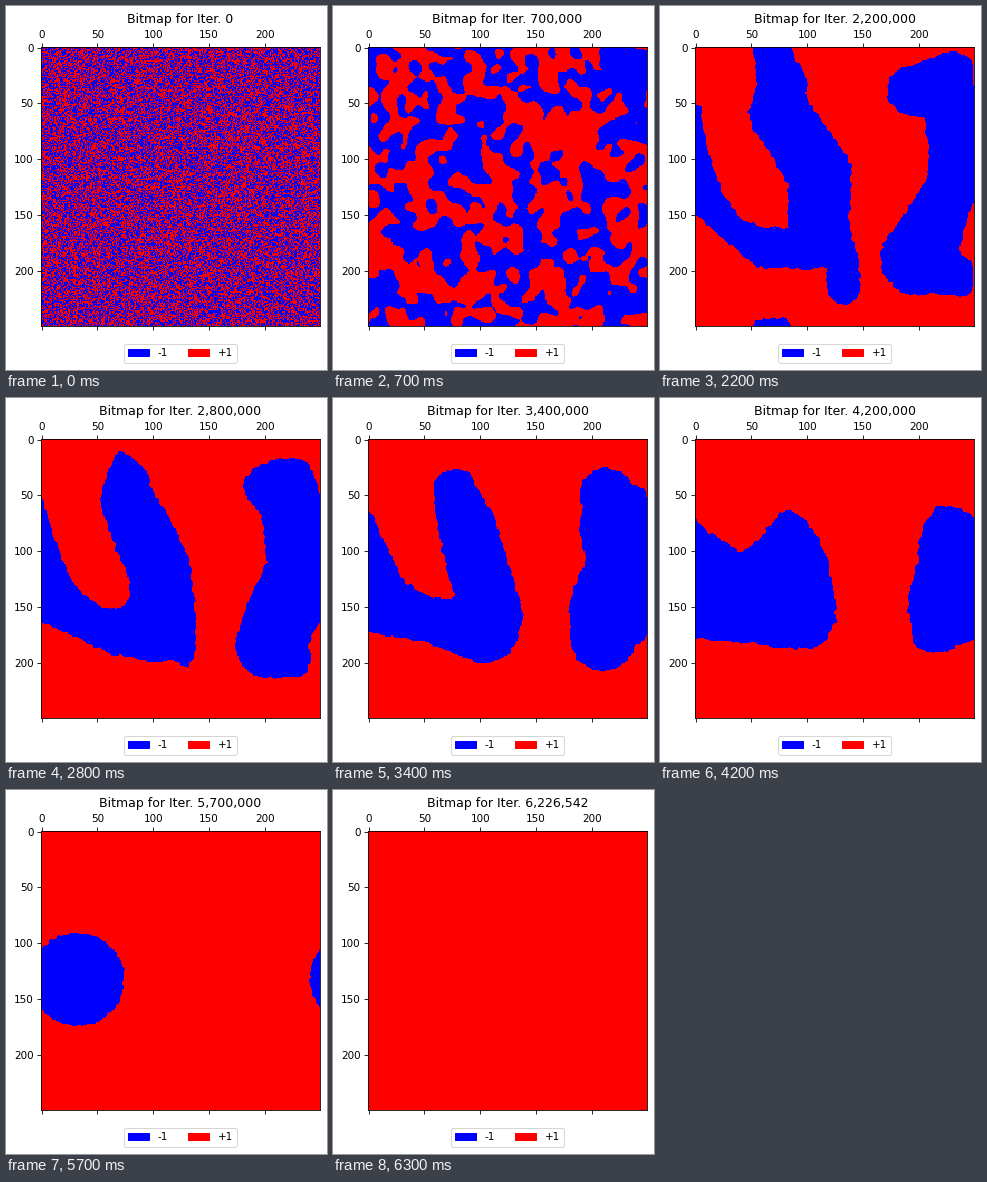
Recreate the animation shown at these times as a matplotlib script. Size 321 by 364 pixels, loop 6.4 s.

```python
import numpy as np
import matplotlib.pyplot as plt
from matplotlib.animation import FuncAnimation
from matplotlib.colors import ListedColormap
from matplotlib.patches import Patch

W, H, DPI = 321, 364, 72
S = 75 / 72                      # text and line scale
LEFT, TOP, SIDE = 35, 41, 279
N, FRAMES, INTERVAL = 250, 64, 100
LAST_ITER = 6226542
CELL = SIDE / N

plt.rcParams.update({
    "font.family": "DejaVu Sans", "font.size": 10 * S,
    "axes.titlesize": 12 * S, "axes.titlepad": 6 * S,
    "axes.linewidth": 0.8 * S, "patch.linewidth": S,
    **{f"{a}tick.major.{k}": v * S for a in "xy"
       for k, v in (("size", 3.5), ("pad", 3.5), ("width", 0.8))},
})

rng = np.random.default_rng(4)
centers = (np.arange(N) + 0.5) * CELL
GX, GY = np.meshgrid(LEFT + centers, TOP + centers)


def blur(a, sigma):
    f = np.fft.fftfreq(N)
    g = np.exp(-2 * (np.pi * sigma * f) ** 2)
    return np.fft.ifft2(np.fft.fft2(a) * np.outer(g, g)).real


def unit(a):
    return (a - a.mean()) / a.std()


def limbs(*chains):
    """Signed distance in cells to thick limbs through (x, y, radius)."""
    field = np.full((N, N), -np.inf)
    for chain in chains:
        for (x0, y0, r0), (x1, y1, r1) in zip(chain, chain[1:]):
            dx, dy = x1 - x0, y1 - y0
            t = ((GX - x0) * dx + (GY - y0) * dy) / (dx * dx + dy * dy)
            t = np.clip(t, 0, 1)
            d = np.hypot(GX - x0 - t * dx, GY - y0 - t * dy)
            field = np.maximum(field, r0 + t * (r1 - r0) - d)
    return field / CELL


def blob(k, cx=71.5, cy=189):
    """Last domain: a rounded box on the wrapped grid, losing area evenly."""
    u = (k - 50) / 12.3
    flat = max(0, 1 - 2 * u)
    r, q, n = 71 * np.sqrt(1 - u), 1 + 0.22 * flat, 2 + flat
    dx = np.abs(GX - cx)
    dx = np.minimum(dx, SIDE - dx) / (r * q)
    dy = np.abs(GY - cy) / (r / q)
    return (1 - (dx ** n + dy ** n) ** (1 / n)) * r / q / CELL


early = limbs(
    [(70, 40, 10), (131, 40, 10), (131, 62, 14), (114, 106, 34),
     (146, 160, 18), (152, 200, 20), (186, 245, 18), (186, 282, 18),
     (168, 322, 12)],
    [(150, 165, 12), (210, 165, 11)],
    [(35, 138, 17), (40, 160, 23), (42, 185, 17), (54, 205, 11),
     (83, 235, 10), (118, 248, 24), (145, 225, 20)],
    [(222, 86, 13), (262, 75, 26), (290, 52, 34), (300, 120, 28),
     (298, 165, 23), (250, 234, 31), (250, 272, 30), (310, 273, 16)],
    [(30, 273, 17), (38, 273, 17)],
    [(78, 316, 12), (122, 316, 12)])
middle = limbs(
    [(111, 38, 18), (122, 80, 25), (119, 106, 30), (160, 168, 32),
     (158, 218, 31), (182, 255, 17), (184, 281, 17)],
    [(150, 242, 21), (105, 242, 20), (74, 225, 13), (47, 195, 17),
     (38, 160, 14), (33, 105, 7)],
    [(252, 85, 25), (290, 78, 32), (301, 140, 31), (290, 185, 25),
     (258, 252, 37), (300, 271, 19)],
    [(100, 320, 7), (122, 320, 8)])
late = limbs(
    [(122, 93, 22), (134, 130, 29), (158, 215, 32), (152, 232, 33),
     (95, 223, 22), (48, 205, 31), (35, 160, 22), (32, 125, 11)],
    [(274, 97, 27), (290, 128, 43), (297, 165, 43), (279, 213, 43),
     (270, 240, 33)])
KEYS = [(15, early), (22, middle), (34, late), (50, blob(50))]

# Random spins lean slightly towards the domains they grow into.
spins = rng.normal(size=(N, N)) + 0.03 * np.tanh(early / 10)
rough = 0.6 * unit(blur(rng.normal(size=(N, N)), 1.5))


def blue_cells(k):
    if k == 0:
        return spins > 0
    if k == FRAMES - 1:
        return np.zeros((N, N), bool)
    if k < 15:
        # domain width grows with the square root of time
        s = max(0, (k - 7) / 8)
        grain = unit(blur(spins, 1.6 * np.sqrt(k)))
        return (1 - s) * 6 * grain + s ** 1.6 * early > 0
    if k >= 50:
        return blob(k) + rough > 0
    for (k0, a), (k1, b) in zip(KEYS, KEYS[1:]):
        if k0 <= k < k1:
            s = (k - k0) / (k1 - k0)
            mix = blur((1 - s) * a + s * b, 1 + 12 * s * (1 - s))
            return mix + rough > 0


fig = plt.figure(figsize=(W / DPI, H / DPI), dpi=DPI, facecolor="white")
ax = fig.add_axes([LEFT / W, 1 - (TOP + SIDE) / H, SIDE / W, SIDE / H])
image = ax.matshow(np.zeros((N, N)), cmap=ListedColormap(["blue", "red"]),
                   vmin=0, vmax=1, interpolation="nearest")
title = ax.set_title("Bitmap for Iter. 0")
ax.legend(handles=[Patch(color="blue", label="-1"),
                   Patch(color="red", label="+1")],
          ncol=2, loc="upper center", bbox_to_anchor=(0.5, -0.0657),
          borderaxespad=0)


def update(k):
    image.set_data(np.where(blue_cells(k), 0, 1))
    title.set_text(f"Bitmap for Iter. {min(k * 100000, LAST_ITER):,}")
    return image, title


anim = FuncAnimation(fig, update, frames=FRAMES, interval=INTERVAL,
                     repeat=True, repeat_delay=0, blit=False)
plt.show()
```
